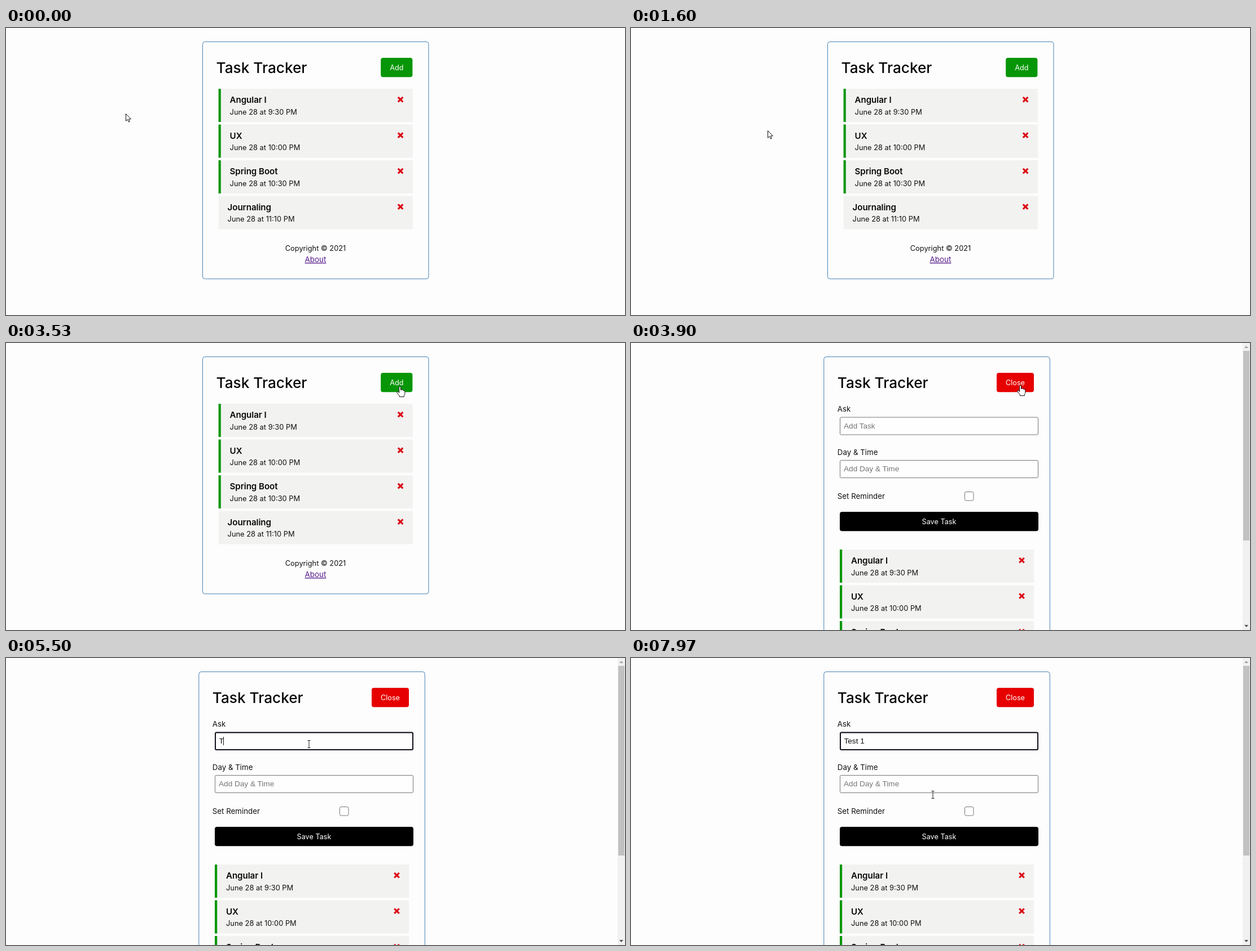
These frames come from a looping animation (1097x510 px, 8 s). An HTML page:

```html
<!DOCTYPE html>
<html lang="en">
<head>
<meta charset="utf-8">
<title>Task Tracker</title>
<style>
  html, body { margin: 0; width: 100%; height: 100%; overflow: hidden; background: #fdfdfd; }
  svg { display: block; width: 1097px; height: 510px; }
  text { font-family: Inter, "Open Sans", sans-serif; font-size: 12.85px; fill: #111; white-space: pre; }
  .h1 { font-size: 26.2px; font-weight: 500; fill: #080808; }
  .h3 { font-size: 15.1px; font-weight: 600; letter-spacing: -.05px; fill: #080808; }
  .label { font-size: 13.3px; }
  .btn { font-size: 12.7px; fill: #fff; text-anchor: middle; }
  .mid { text-anchor: middle; }
  .link { font-size: 13.4px; fill: #551a8b; text-decoration: underline; }
  .field { font-family: "Liberation Sans", Arial, sans-serif; font-size: 13.6px; fill: #111; }
  .hint { fill: #757575; }
</style>
</head>
<body>
<svg id="stage" viewBox="0 0 1097 510"></svg>
<script>
const LOOP = 8000, OPEN = 3750, FOCUS = 4600, IBEAM = 4300;
const FIRST_KEY = 5500, NEXT_KEY = 6200, KEY_GAP = 285, WORD = 'Test 1';
const GREEN = '#079607', RED = '#e60000';

const stage = document.getElementById('stage');

function add(parent, tag, attrs = {}, content = '') {
  const el = document.createElementNS('http://www.w3.org/2000/svg', tag);
  for (const key in attrs) el.setAttribute(key, attrs[key]);
  el.textContent = content;
  parent.appendChild(el);
  return el;
}
const rect = (g, x, y, width, height, fill, rx = 0, more = {}) =>
  add(g, 'rect', { x, y, width, height, fill, rx, ...more });
const text = (g, x, y, cls, s) => add(g, 'text', { x, y, class: cls }, s);
const path = (g, d, more) => add(g, 'path', { d, ...more });
const show = (el, on) => el.setAttribute('visibility', on ? 'inherit' : 'hidden');

const tasks = [
  ['Angular I', '9:30'], ['UX', '10:00'], ['Spring Boot', '10:30'], ['Journaling', '11:10']
];

function drawTasks(g, left, top) {
  tasks.forEach(([name, time], i) => {
    const reminder = i < 3, y = top + 63.5 * i;
    const textX = left + (reminder ? 20 : 16);
    rect(g, left, y, 344, 59, '#f2f2f1');
    if (reminder) rect(g, left, y, 4.2, 59, GREEN);
    text(g, textX, y + 25, 'h3', name);
    text(g, textX, y + 45.5, '', `June 28 at ${time} PM`);
    path(g, `M${left + 318.2} ${y + 14.8}l8.6 8.6m0 -8.6l-8.6 8.6`, { stroke: '#dc0a14', 'stroke-width': 3.1 });
  });
}

function drawCard(left, height) {
  const g = add(stage, 'g');
  rect(g, left, 24.5, 400.5, height, 'none', 4, { stroke: '#4682b4' });
  text(g, left + 24, 80, 'h1', 'Task Tracker');
  return g;
}

function drawButton(g, x, y, w, fill, label) {
  rect(g, x, y, w, 34.3, fill, 4);
  text(g, x + w / 2, y + 22, 'btn', label);
}

function drawField(g, y) {
  rect(g, 370.5, y, 351, 31, '#fefefe', 2, { stroke: '#767676' });
}

function drawScrollbar(g) {
  rect(g, 1084, 0, 13, 510, '#f1f1f1');
  rect(g, 1085, 14, 11, 337, '#c1c1c1');
  path(g, 'M1087 9l3.5 -4 3.5 4z', { fill: '#a3a3a3' });
  path(g, 'M1087 501l3.5 4 3.5 -4z', { fill: '#505050' });
}

// List view
const list = drawCard(348.5, 421.3);
drawButton(list, 664.2, 53, 56.2, GREEN, 'Add');
drawTasks(list, 376.6, 108);
text(list, 548.5, 396, 'mid', 'Copyright © 2021');
text(list, 548.5, 416, 'mid link', 'About');

// Form view
const form = drawCard(341.8, 680);
drawButton(form, 648, 53, 66, RED, 'Close');
text(form, 365.8, 122, 'label', 'Ask');
drawField(form, 132);
const focusRing = rect(form, 371, 132.5, 350, 30.5, 'none', 2, { stroke: '#10101c', 'stroke-width': 2 });
const hint = text(form, 377, 152, 'field hint', 'Add Task');
const typed = text(form, 377.5, 152, 'field', '');
const caret = rect(form, 377, 140, 1, 15, '#111');
text(form, 365.8, 198.5, 'label', 'Day & Time');
drawField(form, 208.5);
text(form, 377, 228, 'field hint', 'Add Day & Time');
text(form, 365.8, 277, 'label', 'Set Reminder');
rect(form, 591.5, 264.5, 15.5, 15.5, '#fff', 2.5, { stroke: '#767676' });
drawButton(form, 370, 300, 352, '#000', 'Save Task');
drawTasks(form, 370, 367);
drawScrollbar(form);

// Pointers, each with its hot spot at 0,0
const outline = { fill: '#fff', stroke: '#111', 'stroke-linejoin': 'round' };
const pointers = {
  arrow: path(stage, 'M.5 .5V13.2L3.4 10.5 5.4 15.1 7.4 14.2 5.5 9.8H9.4Z', outline),
  hand: path(stage, 'M-1.3 1.2Q0 -.8 1.5 1.2V6.3Q5 5 6.6 7.4 8.6 6.8 8.9 8.8V12.6Q8.8 14.8 7.4 16.4V18.6H-.6V17Q-3 14.6 -5 11.2C-6 9.2 -4 8.4 -2.9 9.7L-1.3 11.5Z', outline),
  beam: path(stage, 'M-2.5 -6.5H2.5M0 -6.5V6.5M-2.5 6.5H2.5', { fill: 'none', stroke: '#222' })
};

// The pointer glides from rest to rest, sometimes circling the card on the way
const home = { x: 212, y: 152 };
const moves = [
  { from: 30, to: 1130, x: 242, y: 182, turns: 2 },
  { from: 1600, to: 2370, x: 238, y: 382, turns: 1 },
  { from: 2430, to: 3270, x: 698, y: 77, turns: 1 },
  { from: 3600, to: 3720, x: 690, y: 75, turns: 0 },
  { from: 4100, to: 4400, x: 537, y: 153, turns: 0 },
  { from: 7300, to: 7700, x: 535, y: 243, turns: 0 }
];
const orbit = { x: 485, y: 240, height: 200 };

const clamp = u => Math.min(1, Math.max(0, u));
const smooth = u => u * u * (3 - 2 * u);
const mix = (a, b, u) => a + (b - a) * u;

function pointerAt(t) {
  let { x, y } = home;
  for (const m of moves) {
    const e = smooth(clamp((t - m.from) / (m.to - m.from)));
    const angle = e * m.turns * 2 * Math.PI;
    const swing = 1 - Math.cos(angle);
    x = mix(mix(x, m.x, e), orbit.x, swing);
    y = mix(mix(y, m.y, e), orbit.y, swing) + orbit.height * Math.sin(angle);
  }
  return [x, y];
}

function pointerKind(t, x, y) {
  if (t >= IBEAM) return 'beam';
  return x > 648 && x < 720 && y > 53 && y < 88 ? 'hand' : 'arrow';
}

function typing(t) {
  if (t < FIRST_KEY) return { count: 0, since: t - FOCUS };
  if (t < NEXT_KEY) return { count: 1, since: t - FIRST_KEY };
  const extra = Math.min(WORD.length - 2, Math.floor((t - NEXT_KEY) / KEY_GAP));
  return { count: 2 + extra, since: t - NEXT_KEY - extra * KEY_GAP };
}

function render(t) {
  show(list, t < OPEN);
  show(form, t >= OPEN);

  const { count, since } = typing(t);
  typed.textContent = WORD.slice(0, count);
  show(hint, !count);
  show(focusRing, t >= FOCUS);
  show(caret, t >= FOCUS && since % 1000 < 500);
  caret.setAttribute('x', Math.round(377 + (count && typed.getComputedTextLength())));

  const [x, y] = pointerAt(t);
  const kind = pointerKind(t, x, y);
  for (const name in pointers) show(pointers[name], name === kind);
  pointers[kind].setAttribute('transform', `translate(${Math.round(x)} ${Math.round(y)})`);
}

const start = performance.now();
function tick() {
  render((performance.now() - start) % LOOP);
  requestAnimationFrame(tick);
}
tick();
</script>
</body>
</html>
```
